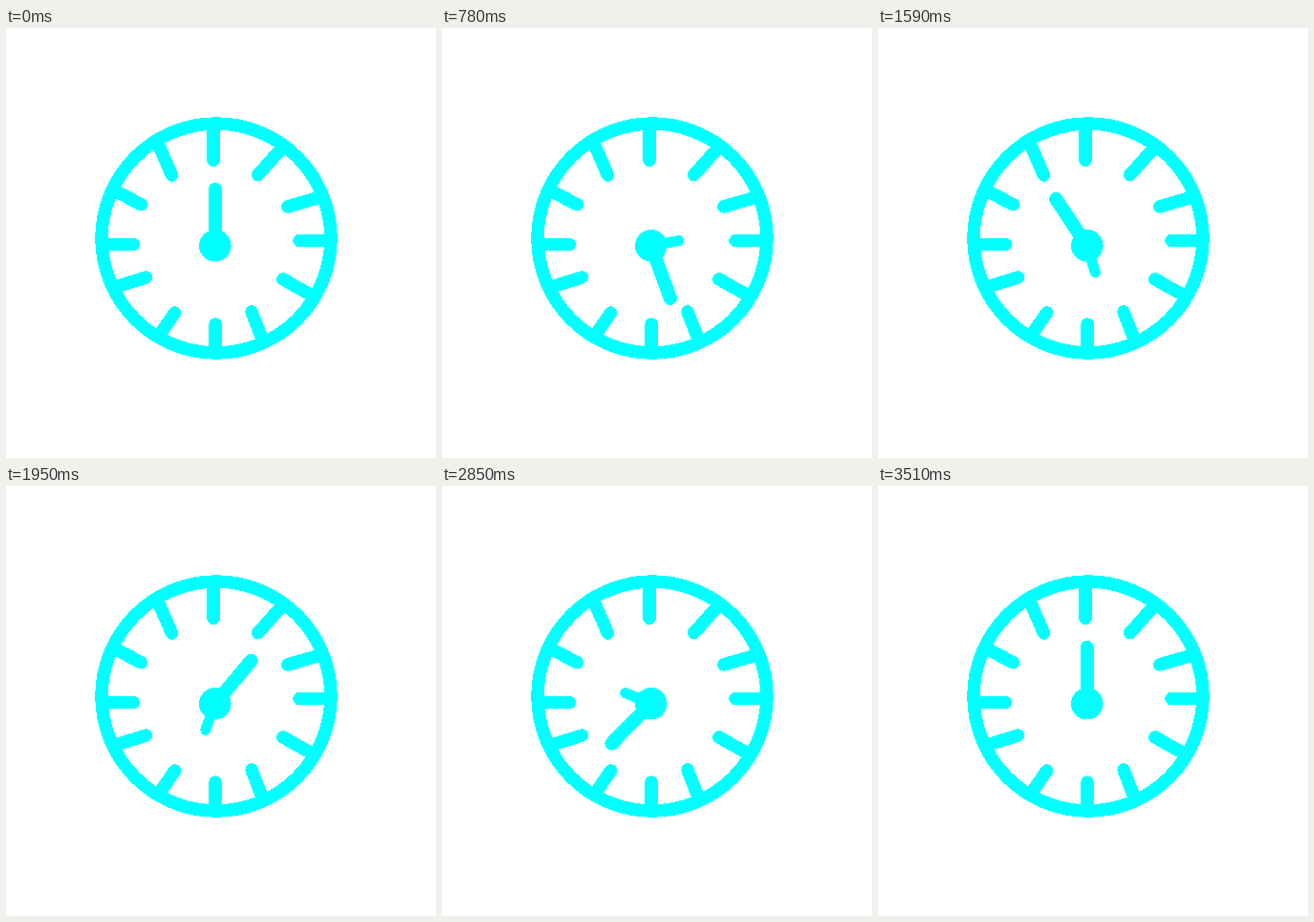
Recreate the animation shown at these times as an HTML page. Size 450 by 450 pixels, loop 3540 ms.

```html
<!DOCTYPE html>
<html lang="en">
<head>
<meta charset="utf-8">
<title>Clock</title>
<style>
  html, body { margin: 0; width: 100%; height: 100%; overflow: hidden; background: #fff; }
  svg { display: block; width: 100%; height: 100%; }
</style>
</head>
<body>
<svg viewBox="0 0 450 450" fill="none" stroke="#0ff" stroke-width="13.5" stroke-linecap="round" shape-rendering="crispEdges">
  <circle cx="220" cy="220" r="120"/>
  <path d="M217 104V138.500M287.500 127L263.700 153.700M329 177L295 186.800M336 222.500H307M322 281L290 263M269 328L257 297
           M219 336V310M160 322L176.600 298M114 271L146.600 261M104 226.500H133.500M113 170L141.500 184.700M159.500 122L173.500 154"/>
  <g transform="translate(218.800 227.700)">
    <path id="hour" d="M0 0V-29.300" stroke-width="11"/>
    <path id="minute" d="M0 0V-58.700" stroke-width="14.200"/>
    <circle r="16.800" fill="#0ff" stroke="none"/>
  </g>
</svg>
<script>
  const STEP = 30, LOOP = 3540, LAST = LOOP / STEP - 1;
  const hour = document.getElementById('hour');
  const minute = document.getElementById('minute');
  const turn = (hand, degrees) => hand.setAttribute('transform', `rotate(${degrees})`);

  // The hands tick every 30 ms; the last tick completes the turn.
  function draw() {
    const tick = Math.floor(performance.now() % LOOP / STEP);
    const angle = 360 * tick / LAST;
    turn(hour, angle);
    turn(minute, 2 * angle);
    requestAnimationFrame(draw);
  }
  draw();
</script>
</body>
</html>
```
